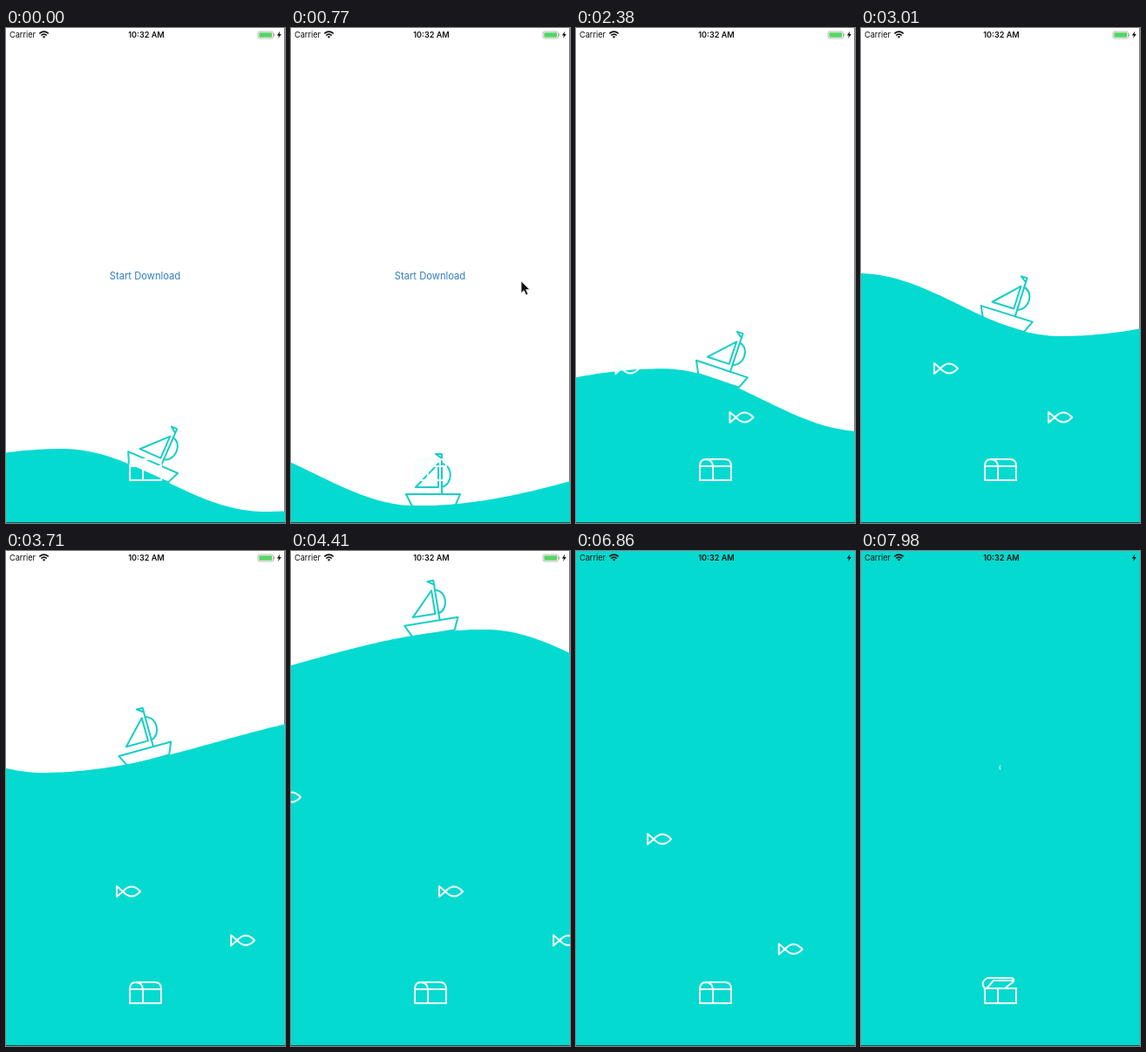
These frames come from a looping animation (320x567 px, 8 s). An HTML page:

```html
<!DOCTYPE html>
<html lang="en">
<head>
<meta charset="utf-8">
<title>Download voyage</title>
<style>
  html, body { margin: 0; height: 100%; overflow: hidden; background: #fff; }
  svg { display: block; width: 100vw; height: 100vh; }
  text { font-family: Inter, Roboto, sans-serif; }
  .line { fill: none; stroke-width: 2; stroke-linejoin: round; stroke-linecap: round; }
  .white { stroke: #f2fffd; }
  .teal { stroke: #18cec5; }
</style>
</head>
<body>
<svg viewBox="0 0 320 567">
  <defs>
    <path id="fishShape" d="M1 -6V6L8 0ZM8 0Q18 -11 28 0Q18 11 8 0"/>
  </defs>
  <path d="M319.5 0V567" stroke="#777"/>
  <text id="button" x="159.5" y="287.5" font-size="11.2" text-anchor="middle" fill="#2f7cc0">Start Download</text>

  <g id="boat" class="line teal">
    <path d="M-31 -14H31L25 0H-24Z"/>
    <path d="M10 -14V-60H3L10 -55"/>
    <path d="M-20 -22L6 -49V-22Z"/>
    <path d="M10 -49C23 -47 23 -25 10 -22"/>
  </g>
  <path id="water" fill="#04dad0"/>
  <g id="school" class="line white"></g>

  <g class="line white">
    <g id="closed">
      <path d="M142 518V502Q142 494 149 494H171Q178 494 178 502V518ZM142 502H178M149 494Q157 495 157 502V518"/>
    </g>
    <g id="open">
      <path d="M142 518V501H178V518ZM157 501V518M142 501Q136 494 145 489H173Q177 491 174 494L166 500M145 500L152 492H174"/>
    </g>
  </g>
  <path id="prize" d="M159.7 245.5Q158.2 248 159.7 250.5" fill="none" stroke="#f2fffd"/>

  <g font-size="9.2" fill="#111">
    <text x="4" y="11.3">Carrier</text>
    <text x="161" y="11.3" font-size="9.1" font-weight="600" text-anchor="middle">10:32 AM</text>
    <g fill="none" stroke="#111" stroke-width="1.6">
      <path d="M38.3 6.3Q43.5 1.9 48.7 6.3M40.2 8.5Q43.5 5.6 46.8 8.5"/>
    </g>
    <path d="M41.7 9.8Q43.5 8.6 45.3 9.8L43.5 11.8Z"/>
    <path d="M314.3 3.5L310.8 8.5H313L312 12L315.8 6.9H313.5Z"/>
  </g>
  <g id="battery">
    <rect x="289" y="4" width="17.5" height="8" rx="2" fill="none" stroke="#aaa" stroke-width=".8"/>
    <rect x="290.3" y="5.3" width="14.9" height="5.4" rx="1" fill="#56d565"/>
    <path d="M307.6 6.5V9.5" stroke="#aaa"/>
  </g>
  <path d="M0 566.5H320" stroke="#0b5a50"/>
  <path id="cursor" d="M0 0V14L3.2 11L5.6 16.2L8 15.1L5.7 10H10Z" fill="#111" stroke="#fff" stroke-width=".8"/>
</svg>
<script>
const $ = id => document.getElementById(id);
const LOOP = 8, WAVE_PERIOD = 2.6, WAVE_LENGTH = 640, FALL = 232, HEIGHT = 72;
const BOAT_X = 163;

// start and end of visibility, time at which x holds, speed, start of the surge
const fishes = [
  { y: 390, from: 2.2, at: 3.01, x: 83, speed: 61.4, surge: 4.5 },
  { y: 282, from: 4, at: 4.41, x: -17, speed: 61.4, surge: 4.46 },
  { y: 446, from: 2.2, at: 4.41, x: 300, speed: 61.4, surge: 4.5 },
  { y: 456, from: 4.4, at: 5.74, x: 51, speed: 62, surge: 6 },
  { y: 330, from: 6, at: 6.2, x: -30, speed: 120, surge: 6.4 }
];
for (const fish of fishes) {
  fish.node = document.createElementNS("http://www.w3.org/2000/svg", "use");
  fish.node.setAttribute("href", "#fishShape");
  $("school").append(fish.node);
}

const show = (id, visible) => $(id).setAttribute("visibility", visible ? "visible" : "hidden");
const place = (node, x, y, turn = 0) =>
  node.setAttribute("transform", `translate(${x} ${y}) rotate(${turn})`);
const clamp = v => Math.max(0, Math.min(1, v));

function waterLevel(t) {
  if (t < 1.78) return 518;
  return t < 3.01 ? 518 - 195 * (t - 1.78) / 1.23 : 323 - 145.4 * (t - 3.01);
}

// The wave falls steeply behind each crest and rises slowly to the next one.
function surface(x, t) {
  const phase = 2 * Math.PI * t / WAVE_PERIOD;
  const crest = 65 - WAVE_LENGTH * t / WAVE_PERIOD + 39 * Math.sin(phase);
  const u = (((x - crest) % WAVE_LENGTH) + WAVE_LENGTH) % WAVE_LENGTH;
  const angle = u < FALL ? u / FALL : 1 + (u - FALL) / (WAVE_LENGTH - FALL);
  return waterLevel(t) - 7 * Math.sin(phase) - HEIGHT / 2 * Math.cos(Math.PI * angle);
}

function draw(t) {
  let outline = "M0 567";
  for (let x = 0; x <= 320; x += 4) outline += `L${x} ${surface(x, t).toFixed(2)}`;
  $("water").setAttribute("d", outline + "V567Z");

  const tilt = 2 + 22 * Math.cos(2 * Math.PI * t / WAVE_PERIOD - 0.2);
  place($("boat"), BOAT_X, surface(BOAT_X, t) + 1, tilt);

  for (const { node, y, from, at, x, speed, surge } of fishes) {
    const rush = Math.max(0, t - surge);
    place(node, x + speed * (t - at) + 150 * rush * rush, y);
    node.setAttribute("visibility", t >= from ? "visible" : "hidden");
  }

  const glide = 1 - (1 - clamp((t - 0.55) / 1.13)) ** 2;
  place($("cursor"), 325 - 173 * glide, 294 - 12 * glide);
  show("cursor", t > 0.55 && t < 2.2);
  show("button", t < 1.9);
  show("battery", t < 5.1);
  show("closed", t < 7.6);
  show("open", t >= 7.6);
  show("prize", t >= 7.9);
}

function tick(now) {
  draw(now / 1000 % LOOP);
  requestAnimationFrame(tick);
}
draw(0);
requestAnimationFrame(tick);
</script>
</body>
</html>
```
